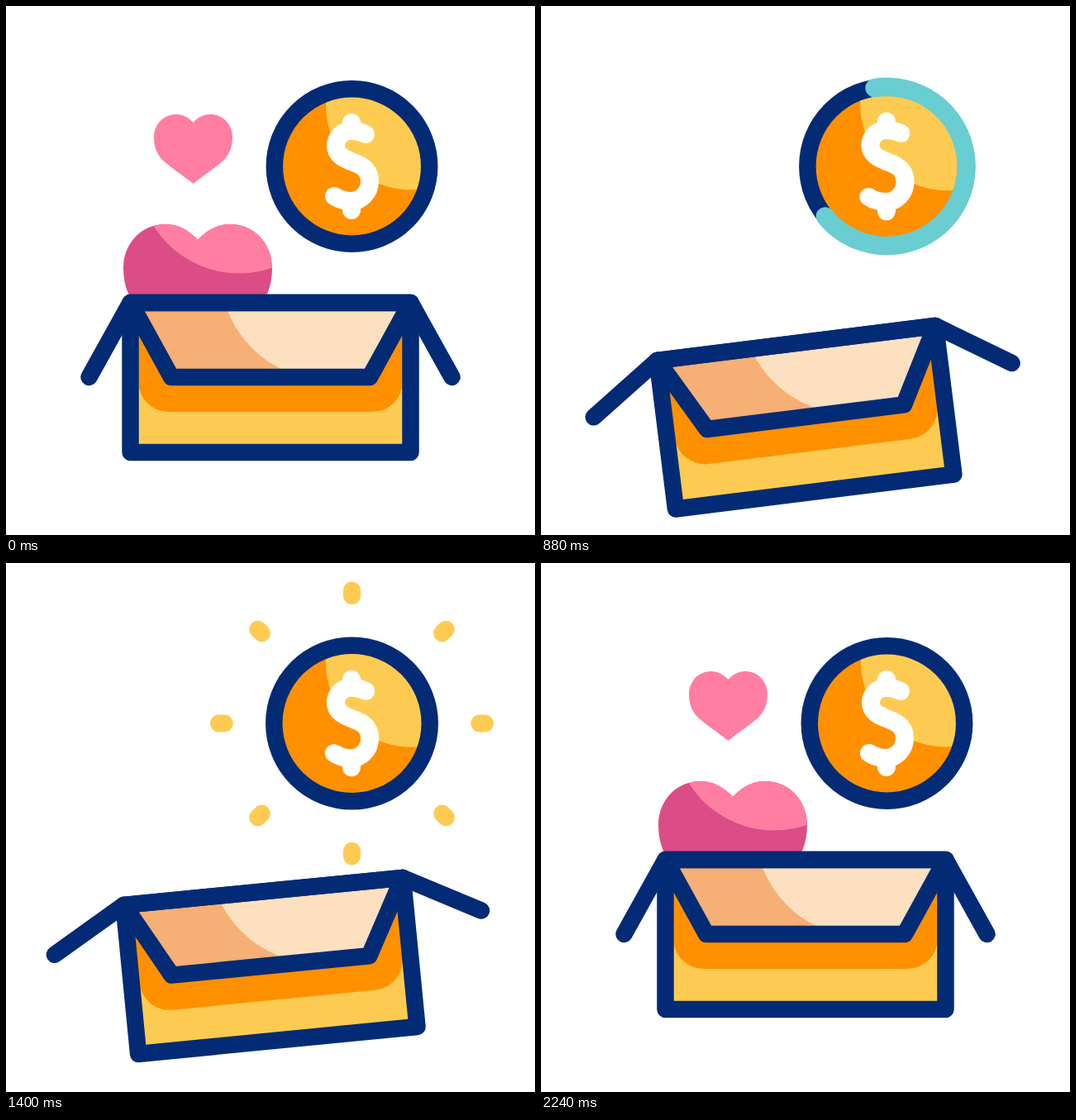
These frames come from a looping animation (640 px wide and 640 px high, 3 s). An HTML page:

```html
<!DOCTYPE html>
<html lang="en">
<head>
<meta charset="utf-8">
<title>Donation box</title>
<style>
  html, body { margin: 0; width: 100%; height: 100%; overflow: hidden; background: #fff; }
  svg { display: block; width: 100%; height: 100%; }
  .line { fill: none; stroke: #032b75; stroke-width: 20.5; stroke-linecap: round; stroke-linejoin: round; }
</style>
</head>
<body>
<svg viewBox="0 0 640 640">
  <defs>
    <path id="heart" d="M0-29C-11-41-24-48-39-48C-68-48-90-25-90 5C-90 28-82 45-69 58C-50 75-25 91 0 111C25 91 50 75 69 58C82 45 90 28 90 5C90-25 68-48 39-48C24-48 11-41 0-29z"/>
    <clipPath id="heartClip"><use href="#heart"/></clipPath>
    <clipPath id="coinClip"><circle r="93"/></clipPath>
    <path id="mouth" d="M150.5 359L200 449H440L489.5 359z"/>
    <clipPath id="mouthClip"><use href="#mouth"/></clipPath>
  </defs>

  <g id="big">
    <use href="#heart" fill="#db4d86"/>
    <circle cx="50" cy="-110" r="121.6" fill="#ff7ea1" clip-path="url(#heartClip)"/>
  </g>
  <use id="small" href="#heart" fill="#ff7ea1"/>

  <g id="box">
    <path fill="#fecb52" d="M150.5 359h339v181h-339z"/>
    <path fill="#ff9000" d="M160 359V454a37 37 0 0 0 37 37H443a37 37 0 0 0 37-37V359z"/>
    <use href="#mouth" fill="#f6af74"/>
    <circle cx="392" cy="319.5" r="133.5" fill="#fde0bf" clip-path="url(#mouthClip)"/>
    <g class="line">
      <path d="M150.5 359h339v181h-339z"/>
      <use href="#mouth"/>
      <path id="leftFlap" d="M150.5 359l-50 90"/>
      <path id="rightFlap" d="M489.5 359l50 90"/>
    </g>
  </g>

  <g transform="translate(418.5 194)">
    <path id="rays" fill="none" stroke="#fecb52" stroke-width="21" stroke-linecap="round"/>
    <g id="coin" fill="none" stroke-linecap="round" stroke-linejoin="round">
      <circle r="93" fill="#ff9000"/>
      <circle cx="71" cy="-74" r="102.5" fill="#fecb52" clip-path="url(#coinClip)"/>
      <circle id="rim" r="93.7" stroke="#032b75"/>
      <circle id="arc" r="93.7" pathLength="360" stroke="#69cdd1"/>
      <path id="dollar" stroke="#fff" transform="translate(-418.5 -194)" d="M418 141v10M418 236v11M435 155C429 152 424 151 418 151C406 151 399 160 399 169C399 181 410 185 420 189C432 193 440 199 440 212C440 226 429 236 418 236C410 236 403 234 397 230"/>
    </g>
  </g>
</svg>
<script>
const el = id => document.getElementById(id);
const set = (id, name, value) => el(id).setAttribute(name, value);

// Sine ease from 0 to 1 between two times; a skew below 1 starts it faster.
function ease(t, from, to, skew = 1) {
  const u = Math.min(1, Math.max(0, (t - from) / (to - from)));
  return (1 - Math.cos(Math.PI * u ** skew)) / 2;
}

// Sink by a depth, then rise past the resting place and settle by 2240 ms.
const dip = (t, depth, sunk, rise, top, bounce) =>
  depth * ease(t, 200, sunk) - (depth + bounce) * ease(t, rise, top) + bounce * ease(t, top, 2240);

function drawBox(t) {
  const drop = 48.3 * (ease(t, 200, 900, .85) - ease(t, 1170, 1920));
  const open = ease(t, 370, 1200, .75) - ease(t, 1260, 2040);
  set('box', 'transform', `translate(0 ${drop}) rotate(${-drop * .147} 320 449.5)`);
  set('leftFlap', 'transform', `rotate(${open * 33.5} 150.5 359)`);
  set('rightFlap', 'transform', `rotate(${-open * 35.5} 489.5 359)`);
}

function drawHearts(t) {
  const big = dip(t, 150, 615, 1680, 2108, 8), small = dip(t, 320, 760, 1500, 2055, 14);
  set('big', 'transform', `translate(${232 + big * .33} ${312 + big}) rotate(${-big * .104})`);
  set('small', 'transform', `translate(${226.5 + small * .04} ${156.3 + small}) rotate(${-small * .079}) scale(.5278)`);
}

function drawCoin(t) {
  const scale = 1 - .235 * ease(t, 200, 480) + .365 * ease(t, 630, 1020) - .13 * ease(t, 1020, 1460);
  set('coin', 'transform', `scale(${scale})`);
  set('rim', 'stroke-width', 20.5 / scale);
  set('dollar', 'stroke-width', 22 / scale);
  set('arc', 'stroke-width', 22.5 / scale);

  // The arc grows to a full turn and is then erased, while it turns by half a circle.
  const turn = 180 * ease(t, 200, 1400, .65);
  const head = 360 * ease(t, 200, 860, .9), tail = 360 * ease(t, 680, 1190);
  set('arc', 'transform', `rotate(${turn + tail})`);
  set('arc', 'stroke-dasharray', `${head - tail} 360`);
  set('arc', 'visibility', head - tail > 1 ? 'visible' : 'hidden');
}

function drawRays(t) {
  const outer = 100 + 61 * ease(t, 800, 1120), inner = 100 + 61 * ease(t, 800, 1700, .6);
  let d = '';
  if (outer - inner > 2) for (let i = 0; i < 8; i++) {
    const x = Math.cos(i * Math.PI / 4), y = Math.sin(i * Math.PI / 4);
    d += `M${x * inner} ${y * inner}L${x * outer} ${y * outer}`;
  }
  set('rays', 'd', d);
}

function tick() {
  const t = Math.floor(performance.now() % 3000 / 40) * 40;
  for (const draw of [drawBox, drawHearts, drawCoin, drawRays]) draw(t);
  requestAnimationFrame(tick);
}
tick();
</script>
</body>
</html>
```
